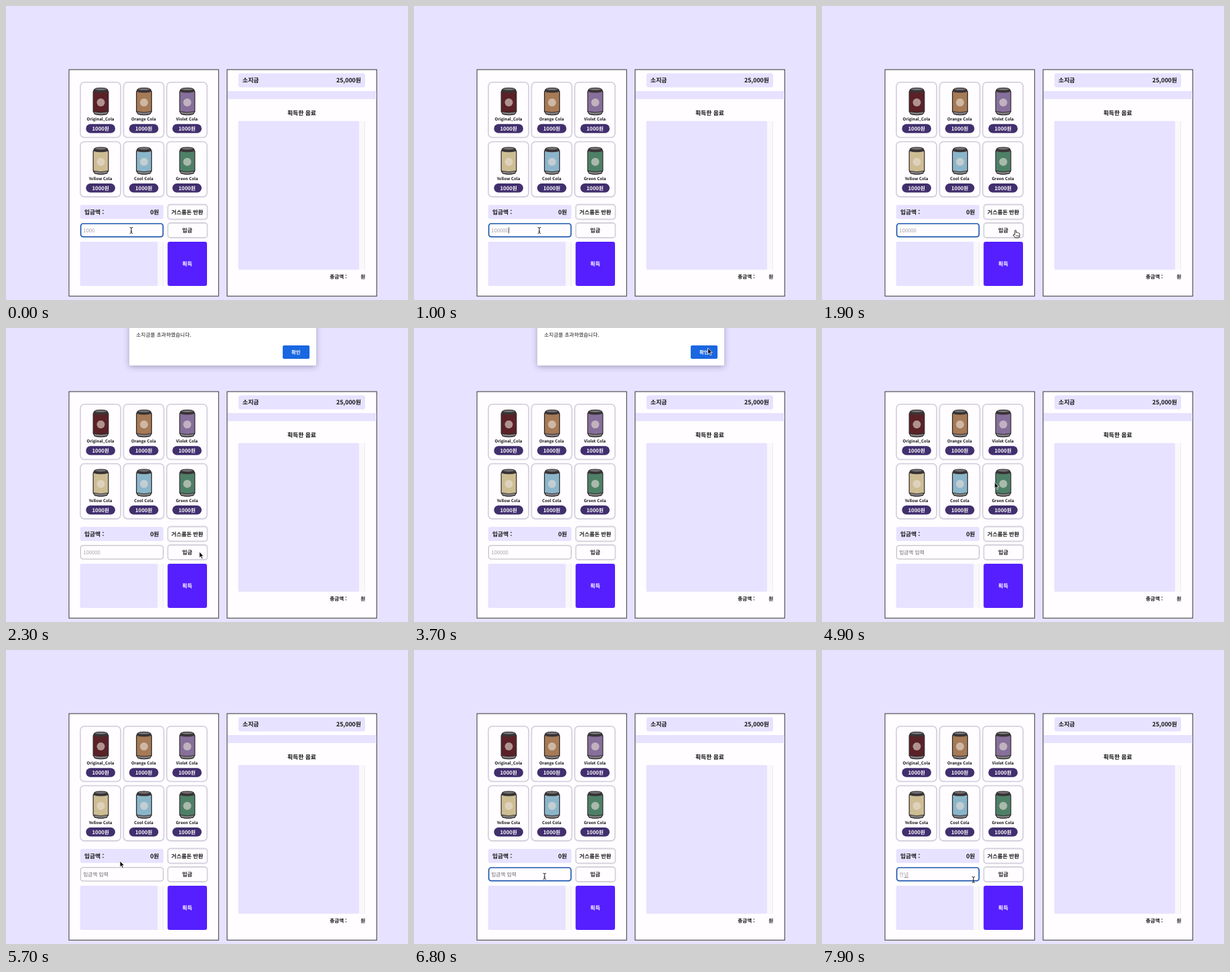
Animation, 600 px wide and 439 px high, one loop 8 s. Source, as an HTML page:

```html
<!DOCTYPE html>
<html lang="ko">
<head>
<meta charset="utf-8">
<title>Vending machine</title>
<style>
  html, body { margin: 0; width: 100%; height: 100%; overflow: hidden; background: #e7e2ff; }
  svg { display: block; width: 600px; height: 439px; }
  text {
    font-family: "Noto Sans CJK KR", "Noto Sans CJK", "Noto Sans", sans-serif;
    text-rendering: geometricPrecision; white-space: pre;
  }
</style>
</head>
<body>
<svg id="stage" viewBox="0 0 600 439">
  <defs>
    <filter id="shadow" x="-10%" y="-30%" width="120%" height="160%">
      <feDropShadow dx="0" dy="2" stdDeviation="4" flood-color="#3c3460" flood-opacity=".4"/>
    </filter>
  </defs>
  <g id="scene"></g>
  <g id="field">
    <rect id="ring" rx="3.500" fill="#fffdff"/>
    <text id="entry" x="115.2" y="338" font-size="7.7"></text>
    <path id="composing" stroke="#777" stroke-width=".8"/>
    <path id="caret" stroke="#222" stroke-width=".8"/>
  </g>
  <g id="dialog"></g>
  <g id="arrow">
    <path d="M0 0V9.300L2.100 7.300 3.600 10.700 5.300 10 3.800 6.700H6.700Z" fill="#111" stroke="#fff" stroke-width=".8" stroke-linejoin="round"/>
  </g>
  <g id="ibeam" fill="none" stroke="#222" stroke-width="1">
    <path d="M-2.300 -4.400Q0 -4.400 0 -3Q0 -4.400 2.300 -4.400M0 -3V3M-2.300 4.400Q0 4.400 0 3Q0 4.400 2.300 4.400M-1.200 1.300H1.200"/>
  </g>
  <g id="hand">
    <path d="M-1 .8Q0 -.6 1 .8V4Q2 3.200 2.800 4.200 3.900 3.600 4.600 4.700 6.300 4.300 6.300 6V8.400L5.200 11.500H-.5L-3.300 7.600Q-3.500 5.800 -1 7.200Z" fill="#fff" stroke="#111" stroke-width=".9" stroke-linejoin="round"/>
    <path d="M1.200 7.500V9.800M2.900 7.500V9.800M4.600 7.500V9.800" stroke="#111" stroke-width=".6"/>
  </g>
</svg>
<script>
const $ = id => document.getElementById(id);
const LILAC = '#e7e2ff', PAPER = '#fffdff';

const box = (x, y, w, h, fill, extra = '') =>
  `<rect x="${x}" y="${y}" width="${w}" height="${h}" fill="${fill}" ${extra}/>`;

// y is the vertical middle of the glyphs
const label = (str, x, y, size, { anchor = 'middle', weight = 700, fill = '#111' } = {}) =>
  `<text x="${x}" y="${y + size * .37}" font-size="${size}" font-weight="${weight}" fill="${fill}" text-anchor="${anchor}">${str}</text>`;

const outlined = (x, y, w, h, r) =>
  box(x, y, w, h, PAPER, `rx="${r}" stroke="#d6d1de" stroke-width="1.8"`);

const can = color => `
  <path d="M21.900 11.500L20.200 15V44.500L22.600 48.300Q31.500 50.800 40.400 48.300L42.800 44.500V15L41.100 11.500Z"
        fill="${color}" stroke="#2a2527" stroke-width="1.200" stroke-linejoin="round"/>
  <path d="M20.500 44.500Q31.500 47.500 42.500 44.500L40.400 48.300Q31.500 50.800 22.600 48.300Z" fill="#858284" stroke="#2a2527" stroke-width=".9"/>
  <path d="M20.300 15Q31.500 18 42.700 15L41.100 11.500H21.900Z" fill="#3a3537"/>
  <ellipse cx="31.500" cy="11.400" rx="9.500" ry="2.100" fill="#747173" stroke="#2a2527" stroke-width="1"/>
  <circle cx="31.500" cy="31" r="6" fill="#e9e0d8" opacity=".6"/>`;

const card = ([name, color], i) => {
  const x = 110 + (i % 3) * 64.5, y = 113 + Math.floor(i / 3) * 88.7;
  return `<g transform="translate(${x} ${y})">
    ${outlined(.9, .9, 60.2, 82.4, 6)}${can(color)}
    ${label(name, 31, 55.6, 6.1)}
    ${box(9.3, 63.3, 43.7, 13.4, '#412f6e', 'rx="6.7"')}
    ${label('1000원', 31.2, 70, 7.7, { fill: '#fff' })}</g>`;
};

const scrollArea = (x, y, w, h) =>
  box(x, y, w, h, '#faf8fb') + box(x, y, w - 8.7, h, LILAC, 'rx="2"') +
  box(x + w - .8, y, .8, h, '#e9e6ec');

const panel = x => box(x, 95, 223.3, 338.2, PAPER, 'stroke="#333" stroke-width="1"');

const drinks = [
  ['Original_Cola', '#5a2126'], ['Orange Cola', '#a67a56'], ['Violet Cola', '#866f9a'],
  ['Yellow Cola', '#cdbd93'], ['Cool Cola', '#8bb5ca'], ['Green Cola', '#4d8067']
];

$('scene').innerHTML = [
  panel(94),
  ...drinks.map(card),
  box(110.7, 297, 124.3, 21, LILAC, 'rx="3"'),
  label('입금액 :', 117, 307.5, 8.7, { anchor: 'start' }),
  label('0원', 228.3, 307.5, 8.7, { anchor: 'end' }),
  outlined(241.5, 296.5, 59, 22, 4),
  label('거스름돈 반환', 270.6, 307.5, 8.2),
  outlined(241.5, 324, 59, 22, 4),
  label('입금', 270.6, 335, 8.2),
  scrollArea(110.6, 352, 124.5, 66),
  box(241.2, 352, 58.8, 66, '#551fff', 'rx="3"'),
  label('획득', 270.6, 384.8, 8.2, { fill: '#fff' }),

  panel(330),
  box(347, 100.6, 189, 21, LILAC, 'rx="3"'),
  label('소지금', 353, 111, 8.9, { anchor: 'start' }),
  label('25,000원', 529.9, 111, 8.8, { anchor: 'end' }),
  box(331, 127, 222, 12, LILAC),
  label('획득한 음료', 441.5, 159.5, 8.8),
  scrollArea(346.7, 171.8, 189, 222),
  label('총금액 :', 483.2, 404, 7.6, { anchor: 'start' }),
  label('원', 536.2, 404, 7.6, { anchor: 'end' })
].join('');

$('dialog').innerHTML =
  box(184, -60, 279, 116, '#fff', 'rx="2.5" filter="url(#shadow)"') +
  label('소지금을 초과하였습니다.', 194.3, 10, 7.7, { anchor: 'start', weight: 400 }) +
  box(413, 26, 40, 20, '#1a67e2', 'rx="2"') +
  label('확인', 432.7, 36, 7.3, { fill: '#fff' });

// [time, value]: each value holds until the next entry
const entries = [[0, '1000'], [900, '10000'], [1000, '100000'], [3900, ''],
  [7200, 'ㅇ'], [7300, '아'], [7400, '안'], [7600, '안ㄴ'], [7700, '안녀'], [7800, '안녕']];
const pointers = [[0, 'ibeam'], [1400, 'arrow'], [1500, 'hand'], [2100, 'arrow'], [5900, 'ibeam']];
const path = [[0, 187, 335], [1100, 187, 335], [1700, 289, 335], [2100, 288.5, 334], [2500, 288.5, 334],
  [3300, 438.5, 30], [4100, 438.5, 30], [4400, 380, 112], [5300, 170, 315], [5700, 170, 315],
  [6000, 178, 335], [6600, 178, 335], [7100, 226, 343], [8000, 226, 343]];
const blinkStarts = [200, 1000, 6000];

const held = (steps, t) => steps.filter(s => s[0] <= t).pop()[1];

function pointerAt(t) {
  const i = path.findIndex(p => p[0] > t);
  const [t0, x0, y0] = path[i - 1], [t1, x1, y1] = path[i];
  const u = (t - t0) / (t1 - t0), k = u * u * (3 - 2 * u);
  return [x0 + (x1 - x0) * k, y0 + (y1 - y0) * k];
}

const show = (id, on) => $(id).setAttribute('visibility', on ? 'visible' : 'hidden');

function setAttributes(id, attrs) {
  for (const key in attrs) $(id).setAttribute(key, attrs[key]);
}

function draw(t) {
  const focused = t < 2100 || t >= 6000;
  const value = held(entries, t);
  setAttributes('ring', focused
    ? { x: 111.6, y: 325, width: 122.8, height: 19.6, stroke: '#1d57ad', 'stroke-width': 1.7 }
    : { x: 111.3, y: 324.8, width: 123.4, height: 20.2, stroke: '#b5b1ba', 'stroke-width': 1 });
  $('entry').textContent = value || '입금액 입력';
  $('entry').setAttribute('fill', value ? '#a5a1a5' : '#636066');

  const composing = t >= 7200;
  show('composing', composing);
  setAttributes('composing', { d: `M${value.length > 1 ? 122.5 : 115.5} 339.5h6.5` });

  const start = blinkStarts.filter(s => s <= t).pop();
  show('caret', focused && !composing && start !== undefined && (t - start) % 1000 < 500);
  setAttributes('caret', { d: `M${115.8 + value.length * 4.3} 330.5V339.5` });

  show('dialog', t >= 2100 && t < 3900);
  const pointer = held(pointers, t), [x, y] = pointerAt(t);
  for (const id of ['arrow', 'ibeam', 'hand']) {
    show(id, id === pointer);
    $(id).setAttribute('transform', `translate(${x} ${y})`);
  }
}

function tick() {
  draw(Math.floor(performance.now() % 8000 / 100) * 100);
  requestAnimationFrame(tick);
}
tick();
</script>
</body>
</html>
```
